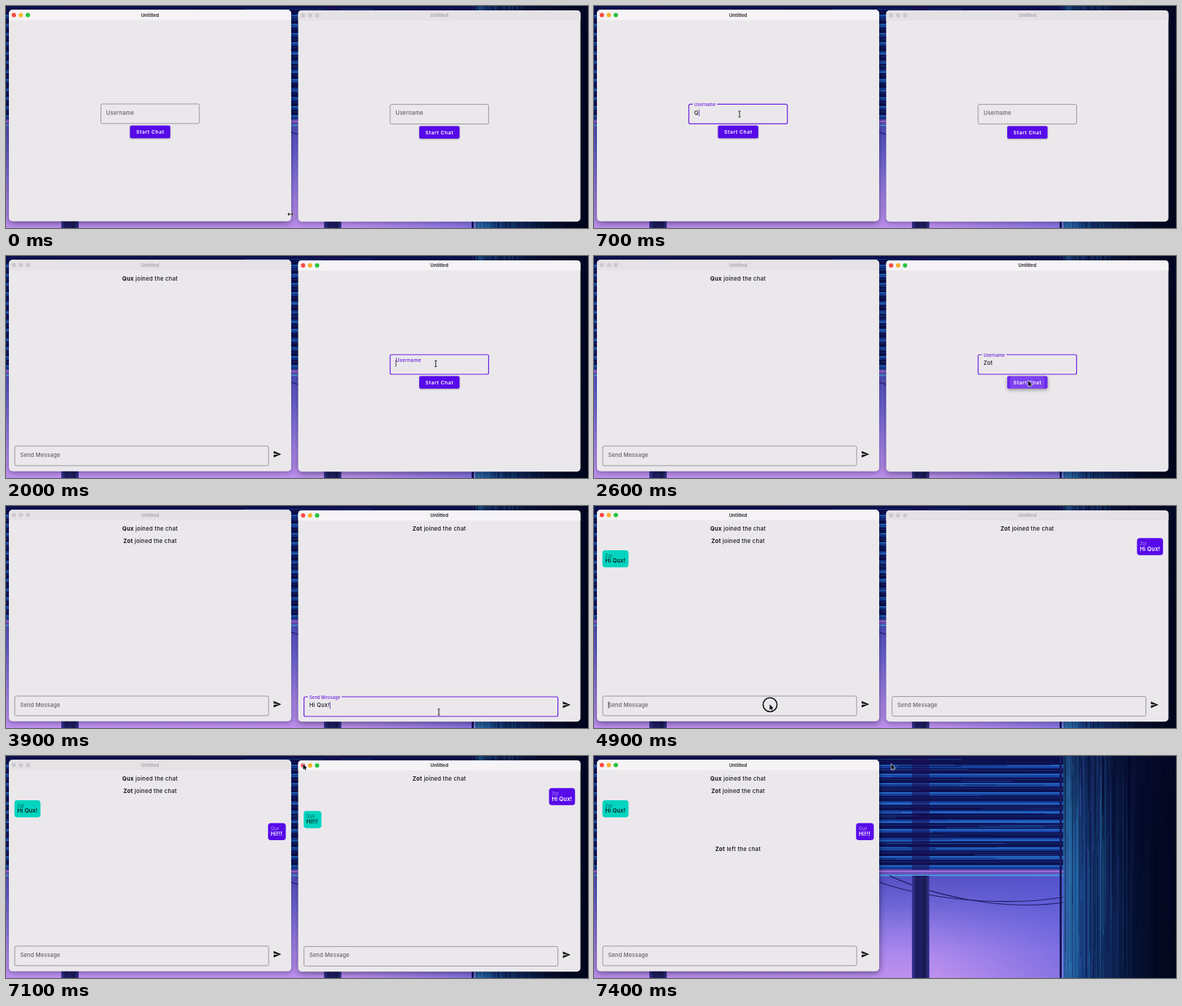
An HTML page with a canvas for the animation above (7500 ms loop, 800 px wide and 306 px high).

```html
<!DOCTYPE html>
<html lang="en">
<head>
<meta charset="utf-8">
<title>Chat demo</title>
<style>
html, body { margin: 0; width: 100%; height: 100%; overflow: hidden; background: #0a0f45; }
canvas { display: block; width: 800px; height: 306px; }
</style>
</head>
<body>
<canvas id="stage" width="800" height="306"></canvas>
<script>
const W = 800, H = 306, LOOP = 7500;
const ctx = document.getElementById('stage').getContext('2d');
const FONT = 'Inter, "Liberation Sans", sans-serif';
const PURPLE = '#570ae9', TEAL = '#02d4bf', INK = '#161418';
const ANN = 'Qux', BEN = 'Zot';
const HELLO = `Hi ${ANN}!`, REPLY = 'Hi!!!';
const wall = paintWall();
const sendIcon = new Path2D('M2.01 21 23 12 2.01 3 2 10l15 2-15 2z');
const arrow = new Path2D('M0 0V7.2L1.7 5.7 2.8 8.2 4 7.7 2.9 5.3H5.2z');

const clamp = v => Math.max(0, Math.min(1, v));
const ease = v => v * v * (3 - 2 * v);
const mix = (a, b, k) => a + (b - a) * k;
const within = (t, a, b) => t >= a && t < b;
const typed = (s, t, from, to) => s.slice(0, Math.floor(clamp((t - from) / (to - from)) * s.length + 1e-6));

function paintWall() {
  const cv = document.createElement('canvas');
  cv.width = W; cv.height = H;
  const g = cv.getContext('2d');
  let seed = 41;
  const rnd = () => (seed = (seed * 16807) % 2147483647) / 2147483647;
  const rect = (x, y, w, h, c) => { g.fillStyle = c; g.fillRect(x, y, w, h); };
  const fade = (x0, y0, x1, y1, ...cols) => {
    const f = g.createLinearGradient(x0, y0, x1, y1);
    cols.forEach((c, i) => f.addColorStop(i / (cols.length - 1), c));
    return f;
  };

  // sky
  rect(0, 160, W, 146, fade(0, 165, 0, 306, '#5450c2', '#6a62d4', '#8b76e2', '#ab88ec', '#bd90ee'));
  rect(470, 160, 180, 146, fade(470, 0, 650, 0, 'rgba(80,85,215,0)', 'rgba(80,85,215,.5)'));
  for (let i = 0; i < 120; i++) rect(rnd() * 650, 168 + rnd() * 90, 1, 1, 'rgba(205,190,255,.4)');

  // blinds
  rect(0, 0, W, 162, '#0d1150');
  for (let y = 12; y < 156; y += 12.6) {
    rect(0, y, 650, 5, '#17419f');
    rect(0, y + rnd() * 3, 650, 1.4, '#2a78d4');
    rect(0, y + 7, 650, 1.5, '#16246f');
  }
  for (let i = 0; i < 110; i++) {
    rect(rnd() * 560, rnd() * 156, 40 + rnd() * 160, 1, rnd() < .4 ? 'rgba(45,130,220,.4)' : 'rgba(10,11,65,.55)');
  }
  rect(0, 156, 650, 9, '#5c4cb6');
  rect(0, 158, 650, 2, '#a36fd6');
  rect(0, 161, 650, 1, '#8257c4');
  rect(0, 163.5, 650, 2, '#48a4e2');

  // wires
  g.strokeStyle = '#201d63';
  g.lineWidth = 1.2;
  for (const d of [0, 7]) {
    g.beginPath();
    g.moveTo(392 + d * 2, 174 - d * 1.3);
    g.bezierCurveTo(460, 197 - d, 560, 209 + d, 650, 194 + d);
    g.stroke();
  }

  // posts
  for (const x of [76, 437]) {
    rect(x, 0, 24, 157, 'rgba(24,14,84,.55)');
    rect(x, 165, 24, 141, fade(x, 0, x + 24, 0, '#3b379c', '#1b1c5c', '#201f66', '#18194f', '#3a379a'));
  }
  rect(640, 0, 3, H, '#15195a');

  // curtain
  rect(645, 0, 155, H, fade(645, 0, 800, 0, '#2b74ae', '#173f82', '#102a60', '#0a1a44', '#061030', '#040a22', '#03071a'));
  rect(645, 0, 155, 165, fade(0, 0, 0, 165, 'rgba(6,9,44,.55)', 'rgba(6,9,44,0)'));
  for (let i = 0; i < 190; i++) {
    const x = 645 + rnd() * 155, a = Math.max(.08, 1 - (x - 645) / 110);
    const c = rnd() < .4 ? `rgba(50,150,205,${.4 * a})` : rnd() < .25 ? `rgba(95,75,200,${.45 * a})` : 'rgba(4,7,36,.4)';
    rect(x, rnd() * 200 - 60, 1, 100 + rnd() * 250, c);
  }
  return cv;
}

function text(s, x, y, size = 7.5, color = INK, weight = 400, gap = .2) {
  ctx.font = `${weight} ${size}px ${FONT}`;
  ctx.letterSpacing = gap + 'px';
  ctx.fillStyle = color;
  ctx.fillText(s, x, y);
  return ctx.measureText(s).width;
}

function box(x, y, w, h, r, fill) {
  ctx.beginPath();
  ctx.roundRect(x, y, w, h, r);
  if (fill) { ctx.fillStyle = fill; ctx.fill(); }
}

function disc(x, y, r, fill) {
  ctx.beginPath();
  ctx.arc(x, y, r, 0, 7);
  ctx.fillStyle = fill;
  ctx.fill();
}

function frame(active) {
  ctx.save();
  ctx.shadowColor = `rgba(0,0,20,${active ? .5 : .35})`;
  ctx.shadowBlur = active ? 10 : 7;
  ctx.shadowOffsetY = 2;
  box(4, 5.3, 388, 291.4, 5, '#ebe8ec');
  ctx.restore();
  box(4, 5.3, 388, 14.2, [5, 5, 0, 0], active ? '#f5f3f5' : '#e5e2e6');
  const lights = active ? ['#fb4b45', '#f8b32a', '#27c33c'] : ['#cdcacf', '#cdcacf', '#cdcacf'];
  lights.forEach((c, i) => disc(10.8 + i * 9.6, 12.4, 3, c));
  ctx.textAlign = 'center';
  text('Untitled', 198, 14.6, 6.4, active ? '#353337' : '#aba8ad', 700, 0);
  ctx.textAlign = 'left';
}

function field(x, y, w, label, value, focus, caret) {
  const k = value ? 1 : focus;
  const on = focus > 0;
  const lx = x + 7.4, ly = mix(y + 14.8, y + 2.9, k);
  box(x, on ? y + .4 : y, w, 27, 2);
  ctx.strokeStyle = on ? '#6a1fdd' : '#908d93';
  ctx.lineWidth = on ? 1.2 : .9;
  ctx.stroke();
  if (k > .5) {
    ctx.font = `500 5.8px ${FONT}`;
    ctx.letterSpacing = '.12px';
    ctx.fillStyle = '#ebe8ec';
    ctx.fillRect(lx - 2, y - 1.5, ctx.measureText(label).width + 4, 4);
  }
  text(label, lx, ly, mix(7.5, 5.8, k), on ? '#6a1fdd' : '#646166', 500, mix(.18, .12, k));
  const end = value ? text(value, lx, y + 14.8, 7.5, INK, 500, .25) : 0;
  if (caret) {
    ctx.fillStyle = value ? '#5a2bb0' : '#222';
    ctx.fillRect(lx + end + .2, y + 7.5, .8, 9.5);
  }
}

function login(s) {
  field(130.4, 135, 135.4, 'Username', s.name, s.focus, s.caret);
  ctx.save();
  ctx.shadowColor = 'rgba(0,0,0,.35)';
  ctx.shadowBlur = s.press ? 5 : 2;
  ctx.shadowOffsetY = s.press ? 2 : .7;
  box(170.4, 164.8, 55.4, 17.4, 2, PURPLE);
  ctx.restore();
  if (s.press) {
    box(170.4, 164.8, 55.4, 17.4, 2, 'rgba(255,255,255,.12)');
    ctx.save();
    ctx.clip();
    disc(198, 173.5, 24, 'rgba(255,255,255,.12)');
    ctx.restore();
  }
  ctx.textAlign = 'center';
  text('Start Chat', 198.3, 176, 6.8, '#fff', 600, .55);
  ctx.textAlign = 'left';
}

function notice(name, rest, y) {
  ctx.letterSpacing = '.25px';
  ctx.font = `700 7.7px ${FONT}`;
  const a = ctx.measureText(name).width;
  ctx.font = `500 7.7px ${FONT}`;
  const x = 198 - (a + ctx.measureText(rest).width) / 2;
  text(name, x, y, 7.7, INK, 700, .25);
  text(rest, x + a, y, 7.7, INK, 500, .25);
}

function bubble(name, msg, y, w, own) {
  const x = own ? 384.6 - w : 11.6;
  box(x, y, w, 23.6, 3.8, own ? PURPLE : TEAL);
  text(name, x + 3.9, y + 9.6, 5.8, own ? 'rgba(255,255,255,.6)' : 'rgba(0,30,35,.65)', 400, .15);
  text(msg, x + 3.9, y + 17.4, 7.6, own ? '#fff' : '#06201f', 600, .15);
}

function chat(s) {
  s.items();
  field(12, 262, 349, 'Send Message', s.draft, s.focus, s.caret);
  if (s.ripple) disc(373, 273.3, 11.6, '#b7b4b9');
  ctx.save();
  ctx.translate(366.9, 267.3);
  ctx.scale(.5, .5);
  ctx.fillStyle = '#111';
  ctx.fill(sendIcon);
  ctx.restore();
}

function leftWindow(t, blink) {
  frame(within(t, 0, 1800) || within(t, 4700, 6900) || t >= 7300);
  if (t < 1200) {
    login({
      name: typed(ANN, t, 600, 900), focus: clamp((t - 450) / 150),
      caret: t >= 500 && (t <= 1000 || blink), press: t >= 1100
    });
    return;
  }
  chat({
    items() {
      if (t >= 1400) notice(ANN, ' joined the chat', 34);
      if (t >= 2800) notice(BEN, ' joined the chat', 51);
      if (t >= 4300) bubble(BEN, HELLO, 61, 35.8, false);
      if (t >= 6000) bubble(ANN, REPLY, 92.4, 24.4, true);
      if (t >= 7300) notice(BEN, ' left the chat', 131);
    },
    draft: t < 6000 ? typed(REPLY, t, 5200, 5700) : '',
    focus: t < 6900 ? clamp((t - 4900) / 150) : 0,
    caret: within(t, 4900, 6900) && (t < 5800 || blink),
    ripple: within(t, 6000, 6400)
  });
}

function rightWindow(t, blink) {
  if (t >= 7200) return;
  ctx.save();
  ctx.translate(397.6, .6);
  frame(within(t, 1800, 4700) || t >= 6900);
  if (t < 2700) {
    login({
      name: typed(BEN, t, 2100, 2400), focus: clamp((t - 1950) / 150),
      caret: t >= 2000 && (t <= 2500 || blink), press: t >= 2500
    });
  } else {
    chat({
      items() {
        if (t >= 2800) notice(BEN, ' joined the chat', 33.6);
        if (t >= 4300) bubble(BEN, HELLO, 43.6, 35.8, true);
        if (t >= 6000) bubble(ANN, REPLY, 75.2, 24.4, false);
      },
      draft: t < 4300 ? typed(HELLO, t, 3350, 3900) : '',
      focus: t < 4700 ? clamp((t - 3250) / 150) : 0,
      caret: within(t, 3300, 4700) && (t <= 4000 || blink),
      ripple: within(t, 4300, 4600)
    });
  }
  ctx.restore();
}

// time, x, y
const path = [
  [0, 391, 287], [100, 391, 287], [500, 200, 148], [900, 200, 150], [1100, 213, 177],
  [1400, 213, 177], [1800, 590, 148], [2300, 592, 149], [2500, 597, 172], [2900, 597, 172],
  [3300, 595, 284], [4000, 595, 284], [4300, 771, 272], [4400, 771, 272], [4800, 241.5, 273.5],
  [5400, 241.5, 273.5], [5900, 373.5, 270], [6300, 373.5, 270], [6900, 408.5, 11.3], [LOOP, 408.5, 11.3]
];
const beam = [[500, 900], [1900, 2400], [3300, 4100], [5000, 5600]];

function line(w, color, ...pts) {
  ctx.beginPath();
  for (let i = 0; i < pts.length; i += 4) {
    ctx.moveTo(pts[i], pts[i + 1]);
    ctx.lineTo(pts[i + 2], pts[i + 3]);
  }
  ctx.lineWidth = w;
  ctx.strokeStyle = color;
  ctx.stroke();
}

function pointer(t) {
  const i = path.findIndex(p => p[0] > t);
  const a = path[i - 1], b = path[i];
  const k = ease((t - a[0]) / (b[0] - a[0]));
  ctx.save();
  ctx.translate(mix(a[1], b[1], k), mix(a[2], b[2], k));
  if (within(t, 4800, 5000)) {
    ctx.beginPath();
    ctx.arc(.5, .4, 9.6, 0, 7);
    ctx.lineWidth = 1.6;
    ctx.strokeStyle = '#111';
    ctx.stroke();
  }
  if (t < 200) {
    for (const [w, c] of [[2.4, '#fff'], [1.1, '#111']]) {
      line(w, c, -3.5, 0, 3.5, 0, -3.5, 0, -1.8, -1.7, -3.5, 0, -1.8, 1.7, 3.5, 0, 1.8, -1.7, 3.5, 0, 1.8, 1.7);
    }
  } else if (beam.some(r => within(t, ...r))) {
    line(1, '#222', 0, -3.6, 0, 3.6, -1.6, -4, 1.6, -4, -1.6, 4, 1.6, 4);
  } else {
    ctx.lineWidth = 1.2;
    ctx.strokeStyle = '#e8e8ee';
    ctx.stroke(arrow);
    ctx.fillStyle = '#000';
    ctx.fill(arrow);
  }
  ctx.restore();
}

function draw(now) {
  const t = Math.floor((now % LOOP) / 100) * 100;
  const blink = Math.floor((t + 300) / 500) % 2 === 0;
  ctx.drawImage(wall, 0, 0);
  leftWindow(t, blink);
  rightWindow(t, blink);
  pointer(t);
}

let start;
function tick(now) {
  start ??= now;
  draw(now - start);
  requestAnimationFrame(tick);
}
draw(0);
requestAnimationFrame(tick);
</script>
</body>
</html>
```
